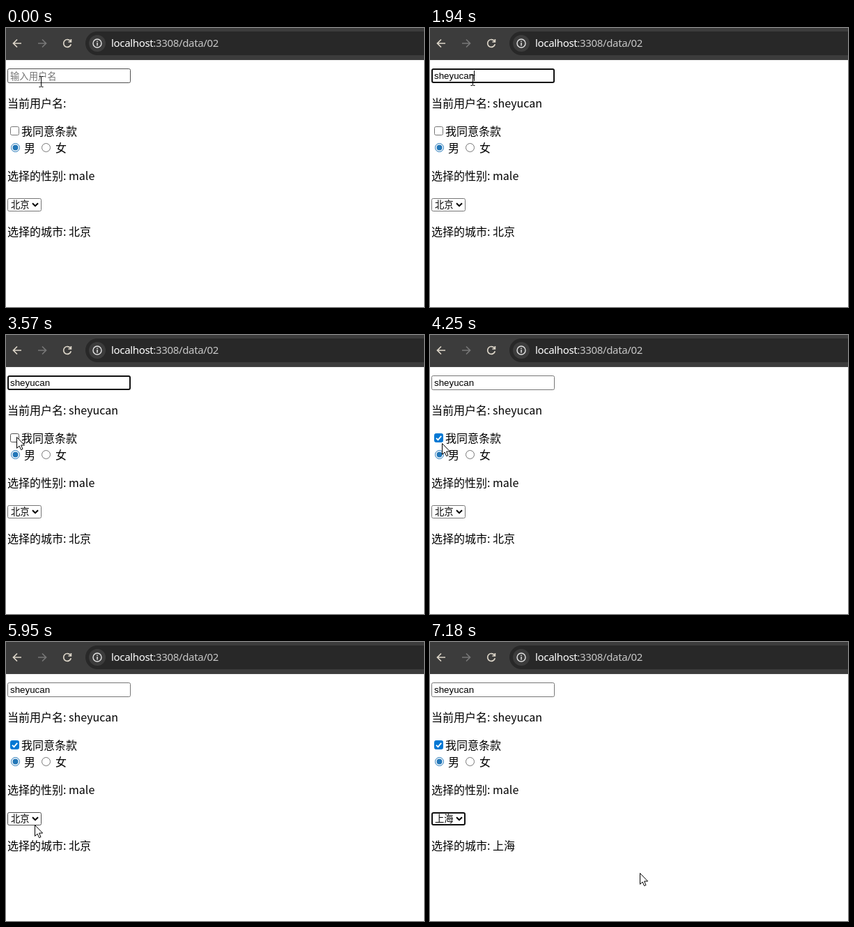
Recreate the animation shown at these times as an HTML page. Size 600x400 px, loop 7250 ms.

```html
<!DOCTYPE html>
<html lang="zh-CN">
<head>
<meta charset="utf-8">
<title>表单</title>
<style>
html, body { margin: 0; width: 100%; height: 100%; overflow: hidden; background: #fff; }
svg { display: block; width: 600px; height: 400px; }
text { font: 16px "Noto Sans CJK SC", "Noto Sans CJK", sans-serif; fill: #000; white-space: pre; }
.small { font-size: 13.333px; }
.field { font: 13.333px "Liberation Sans", "Noto Sans CJK SC", sans-serif; }
.hint { fill: #757575; }
.url { font: 15px "Noto Sans", sans-serif; letter-spacing: -.34px; fill: #c7c7c7; }
.icon { fill: none; stroke: #dcd5c8; stroke-width: 1.7; }
.control { fill: #fff; stroke: #767676; }
.hover { stroke: #4f4f4f; }
.focus { stroke: #101010; }
.on { stroke: #2377b8; }
.dot { fill: #2377b8; }
#box.on { fill: #0078d4; stroke: #0078d4; }
</style>
</head>
<body>
<svg viewBox="0 0 600 400">
  <rect width="600" height="400" fill="#fff"/>
  <rect width="600" height="46" fill="#3c3c3c"/>
  <rect y="45" width="600" height="1" fill="#474747"/>
  <rect x="114" y="5" width="540" height="34" rx="17" fill="#282828"/>
  <circle cx="131" cy="22" r="12" fill="#3c3c3c"/>
  <g class="icon">
    <path d="M22 22H11M16 16.5L10.5 22L16 27.5"/>
    <path d="M46 22H57M52 16.5L57.5 22L52 27.5" stroke="#777"/>
    <path d="M92.6 19A5.4 5.4 0 1 0 93.3 23.2M93.4 16V20H89.4"/>
    <circle cx="131" cy="22" r="6" stroke="#e3e3e3" stroke-width="1.4"/>
    <path d="M131 21V25.4M131 18.4V19.9" stroke="#e3e3e3" stroke-width="1.5"/>
  </g>
  <text class="url" x="151" y="27"><tspan fill="#fff">localhost</tspan>:3308/data/02</text>

  <rect id="input"/>
  <text id="value" x="6"></text>
  <rect id="caret" y="61" width="1" height="15"/>
  <text id="nameLine" class="page" x="2" y="114"></text>

  <rect id="box" x="6.5" y="141.5" width="12" height="12" rx="2"/>
  <path id="check" d="M9 147.8L11.5 150.3L16.2 144.8" fill="none" stroke="#fff" stroke-width="1.9"/>
  <text class="page" x="22" y="154">我同意条款</text>

  <circle id="male" cx="13.5" cy="171.5" r="6"/>
  <circle id="maleDot" class="dot" cx="13.5" cy="171.5" r="4"/>
  <text class="page" x="26" y="178">男</text>
  <circle id="female" cx="57.5" cy="171.5" r="6"/>
  <circle id="femaleDot" class="dot" cx="57.5" cy="171.5" r="4"/>
  <text class="page" x="71" y="178">女</text>
  <text id="sexLine" class="page" x="2" y="218"></text>

  <rect id="select"/>
  <text id="city" class="small" x="7" y="258"></text>
  <path d="M38 251.2L42 255.2L46 251.2" fill="none" stroke="#000" stroke-width="2"/>
  <text id="cityLine" class="page" x="2" y="298"></text>

  <g id="menu">
    <rect x="2.5" y="263.5" width="48" height="109" fill="#fff" stroke="#767676"/>
    <rect id="mark" x="3" width="47" height="27" fill="#1967d2"/>
  </g>

  <path id="beam" d="M-3 -7.5H-1L0 -6.8L1 -7.5H3M0 -7V7M-3 7.5H-1L0 6.8L1 7.5H3" fill="none" stroke="#000"/>
  <path id="arrow" d="M.5 .5V16.3L4.1 13L6.6 18.6L9 17.5L6.6 12H11.6Z" fill="#fff" stroke="#000"/>
</svg>
<script>
const LOOP = 7250, BLINK = 530, STEP = 70, KEY_GAP = 80, ROW = 27, MENU_TOP = 264;
const CITIES = ['北京', '上海', '广州', '深圳'];

const moves = [], actions = [];
const move = (start, end, x, y) => moves.push({ start, end, to: [x, y] });
const act = (at, change) => actions.push({ at, change });
const type = (at, keys) => [...keys].forEach((key, i) =>
  act(at + i * KEY_GAP, s => ({ name: s.name + key, blink: at + i * KEY_GAP })));

move(70, 470, 61, 75);
act(470, () => ({ focus: 'input', blink: 470 }));
type(940, 'sh');
type(1280, 'eyu');
type(1680, 'can');
move(2870, 3570, 15, 146);
act(3710, () => ({ focus: '', checked: true }));
move(3640, 3910, 14, 154);
move(4250, 4590, 55, 172);
act(4590, () => ({ sex: 'female' }));
move(4720, 4930, 27, 172);
move(5000, 5130, 14, 171);
act(5390, () => ({ sex: 'male' }));
move(5600, 5950, 41, 262);
move(6020, 6230, 37, 252);
act(6300, () => ({ open: true }));
move(6370, 6640, 29, 310);
act(6900, () => ({ open: false, city: CITIES[1], focus: 'select' }));
move(6970, 7180, 301, 331);

const $ = {};
document.querySelectorAll('[id]').forEach(el => $[el.id] = el);
const page = [...document.querySelectorAll('.page')];

function set(el, attrs) {
  for (const k in attrs) el.setAttribute(k, attrs[k]);
}
const show = (el, on) => set(el, { visibility: on ? 'visible' : 'hidden' });

const items = CITIES.map((name, i) => {
  const el = document.createElementNS('http://www.w3.org/2000/svg', 'text');
  set(el, { class: 'small', x: 7, y: MENU_TOP + 19 + ROW * i });
  el.textContent = name;
  return $.menu.appendChild(el);
});

function over(el, [x, y]) {
  const b = el.getBBox();
  return x >= b.x && x <= b.x + b.width && y >= b.y && y <= b.y + b.height;
}

// The pointer advances once per STEP, eased between stops
function pointer(t) {
  let pos = [50, 77];
  for (const { start, end, to } of moves) {
    if (t < start) break;
    const done = (Math.floor((t - start) / STEP) + 1) * STEP;
    const u = t >= end ? 1 : Math.min(1, done / (end - start + STEP));
    const k = u * u * (3 - 2 * u);
    pos = pos.map((p, i) => p + (to[i] - p) * k);
  }
  return pos.map(Math.round);
}

function stateAt(t) {
  const s = { name: '', focus: '', blink: 0, checked: false, sex: 'male', city: CITIES[0], open: false };
  for (const a of actions) if (a.at <= t) Object.assign(s, a.change(s));
  return s;
}

function style(el, pos, on, name) {
  set(el, { class: 'control ' + (on ? name : over(el, pos) ? 'hover' : '') });
}

function frame(el, pos, x, y, w, h, focus) {
  const line = focus ? 2 : 1;
  set(el, { x: x + line / 2, y: y + line / 2, width: w - line, height: h - line, rx: 2, 'stroke-width': line });
  style(el, pos, focus, 'focus');
}

function render(t) {
  const pos = pointer(t), s = stateAt(t);
  const typing = s.focus === 'input';

  frame($.input, pos, 2, 58, 177, 21, typing);
  $.value.textContent = s.name || '输入用户名';
  set($.value, { y: s.name ? 73 : 74, class: s.name ? 'field' : 'field hint' });
  set($.caret, { x: 6 + (s.name ? Math.floor($.value.getComputedTextLength()) : 0) });
  show($.caret, typing && Math.floor((t - s.blink) / BLINK) % 2 === 0);
  $.nameLine.textContent = '当前用户名: ' + s.name;

  style($.box, pos, s.checked, 'on');
  show($.check, s.checked);
  for (const sex of ['male', 'female']) {
    style($[sex], pos, s.sex === sex, 'on');
    show($[sex + 'Dot'], s.sex === sex);
  }
  $.sexLine.textContent = '选择的性别: ' + s.sex;

  frame($.select, pos, 2, 244, 49, 19, s.focus === 'select');
  $.city.textContent = s.city;
  $.cityLine.textContent = '选择的城市: ' + s.city;

  const row = Math.max(0, Math.floor((pos[1] - MENU_TOP) / ROW));
  set($.menu, { display: s.open ? 'inline' : 'none' });
  set($.mark, { y: MENU_TOP + ROW * row });
  items.forEach((el, i) => el.style.fill = i === row ? '#fff' : '#000');

  const beam = !s.open && [$.input, ...page].some(el => over(el, pos));
  set($.beam, { transform: `translate(${pos[0] + .5} ${pos[1]})` });
  set($.arrow, { transform: `translate(${pos})` });
  show($.beam, beam);
  show($.arrow, !beam);
}

const begin = performance.now();
function tick() {
  render((performance.now() - begin) % LOOP);
  requestAnimationFrame(tick);
}
tick();
</script>
</body>
</html>
```
